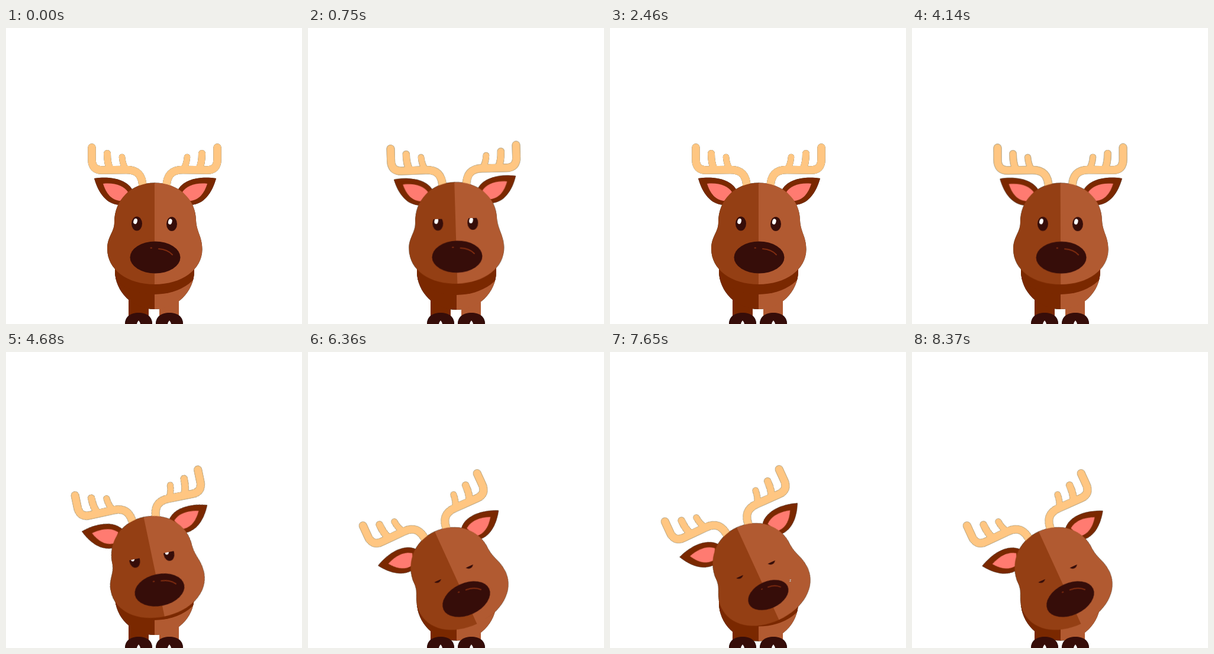
Recreate the animation shown at these times as an HTML page. Size 500 by 500 pixels, loop 9000 ms.

```html
<!DOCTYPE html>
<html lang="en">
<head>
<meta charset="utf-8">
<title>Sleepy deer</title>
<style>
  html, body { margin: 0; width: 100%; height: 100%; overflow: hidden; background: #fff; }
  svg { display: block; width: 100vw; height: 100vh; }
  .dark { fill: #7a2800; }
  .left { fill: #943f14; }
  .right { fill: #b15a31; }
  .ink { fill: #360d09; }
  #deer { filter: drop-shadow(0 0 .5px #24474a); }
  #antler { fill: none; stroke: #ffc682; stroke-linecap: round; stroke-linejoin: round; }
  #snore { font: bold 24px "Open Sans", Arial, sans-serif; fill: #fff; stroke: #24474a; stroke-width: .8; text-anchor: middle; }
</style>
</head>
<body>
<svg viewBox="0 0 500 500">
  <defs>
    <clipPath id="bodyClip"><ellipse cx="251" cy="410" rx="67" ry="65"/></clipPath>
    <clipPath id="lidClip"><rect id="lid" x="200" y="316" width="100" height="40"/></clipPath>
    <g id="antler">
      <path d="M145 202V222Q145 240 162 240L203 239.5C222 239.5 231 248 231 270" stroke-width="13.500"/>
      <path d="M171 212Q171 229 176 238" stroke-width="12"/>
      <path d="M196 218Q197 230 202 238" stroke-width="10.500"/>
    </g>
    <g id="ear">
      <path class="dark" d="M149 254C174 250 205 254 215 276L192 299C170 298 156 279 149 254Z"/>
      <path fill="#ff7b71" d="M164 263C185 261 199 267 206 277L193 292C178 291 169 279 164 263Z"/>
    </g>
    <g id="hoof">
      <path class="ink" d="M-23 500C-23 488 -14 481 0 481S23 488 23 500Z"/>
      <path fill="#fff" d="M-3 500Q-2 496 0 494Q2 496 3 500Z"/>
    </g>
  </defs>

  <g id="deer">
    <rect class="dark" x="207" y="440" width="34" height="60"/>
    <rect class="right" x="259" y="440" width="33" height="60"/>
    <g id="body" clip-path="url(#bodyClip)">
      <rect class="dark" x="180" y="340" width="72" height="140"/>
      <rect class="right" x="251" y="340" width="70" height="140"/>
      <ellipse class="dark" cx="251" cy="390" rx="81" ry="60"/>
    </g>
    <use href="#hoof" x="224"/>
    <use href="#hoof" x="276"/>

    <g id="head">
      <use href="#antler"/>
      <use href="#antler" transform="translate(502 0) scale(-1 1)"/>
      <use href="#ear" id="earL"/>
      <g transform="translate(504 0) scale(-1 1)"><use href="#ear" id="earR"/></g>
      <path class="left" d="M251 261.500C212 261.500 183 290 183 328C183 345 171 352 171 373C171 408 205 433 251 433H252V261.500Z"/>
      <path class="right" d="M251 261.500C292 261.500 321 290 321 325C322 345 331.500 352 331.500 374C331.500 408 297 433 251 433Z"/>
      <g clip-path="url(#lidClip)">
        <ellipse class="ink" cx="221" cy="330.500" rx="9" ry="12"/>
        <ellipse class="ink" cx="280" cy="331" rx="9" ry="12"/>
        <ellipse fill="#fff" cx="218.700" cy="326.500" rx="3.200" ry="4.800" transform="rotate(15 219 326)"/>
        <ellipse fill="#fff" cx="277.300" cy="327" rx="3.200" ry="4.800" transform="rotate(15 277 327)"/>
      </g>
      <g id="nose">
        <ellipse class="ink" cx="252" cy="387.500" rx="42.500" ry="27"/>
        <g fill="none" stroke="#7f2c10" stroke-width="2" stroke-linecap="round">
          <path d="M258 373Q273 374 281 383"/>
          <path d="M244.500 371.500H246"/>
        </g>
      </g>
    </g>
  </g>
  <text id="snore" y="9">Z</text>
</svg>
<script>
  const LOOP = 9000;
  const $ = id => document.getElementById(id);
  const set = (id, name, value) => $(id).setAttribute(name, value);
  const ramp = (t, a, b) => Math.min(1, Math.max(0, (t - a) / (b - a)));
  const smooth = u => u * u * (3 - 2 * u);
  const ease = (t, a, b) => smooth(ramp(t, a, b));

  // Two short nods before falling asleep
  const nodAt = t => ease(t, 330, 1200) - ease(t, 1380, 1710)
    + ease(t, 1830, 2280) - ease(t, 2280, 2460);

  const breathAt = t => t < 7200 ? ease(t, 6720, 7200)
    : 1 - smooth(ramp(t, 7200, 8370) ** 0.8);

  const twitch = (t, a, b) => Math.sin(ramp(t, a, b) * Math.PI * 2);

  function drawSnore(t) {
    const start = t < 7000 ? 4990 : 7630;
    const u = ramp(t, start, start + 650);
    const x = 302 + 49 * u + 5 * Math.sin(u * Math.PI * 2);
    const y = 391 - 138 * u;
    set("snore", "transform", `translate(${x} ${y}) scale(${0.15 + 0.85 * ramp(u, 0, 0.7)})`);
    set("snore", "opacity", u > 0 && u < 1 ? 1 - ramp(u, 0.7, 1) : 0);
  }

  function draw(t) {
    const sleep = ramp(t, 4080, 4980) ** 1.81;
    const nod = nodAt(t);
    const breath = breathAt(t);

    const x = 252 + 15.2 * sleep;
    const y = 387 + 30 * sleep - 2.5 * nod - 12.5 * breath;
    const tilt = -24.6 * sleep - 3.6 * nod;
    set("head", "transform", `translate(${x} ${y}) rotate(${tilt}) translate(-252 -387)`);
    set("body", "transform", `translate(0 ${12.5 * sleep * sleep + 2 * nod + 2 * breath})`);

    const wobble = twitch(t, 5010, 5640) + twitch(t, 5790, 6690);
    const droop = 18 * sleep - 12 * breath + 0.8 * wobble;
    set("earL", "transform", `rotate(${-droop} 210 293)`);
    set("earR", "transform", `rotate(${-droop} 210 293)`);

    set("lid", "y", 318 + 21 * Math.max(sleep, 0.5 * nod));
    const size = 1 - 0.28 * breath;
    set("nose", "transform", `translate(252 387) scale(${size}) translate(-252 -387)`);
    drawSnore(t);
  }

  const begin = performance.now();
  function tick() {
    draw((performance.now() - begin) % LOOP);
    requestAnimationFrame(tick);
  }
  tick();
</script>
</body>
</html>
```
